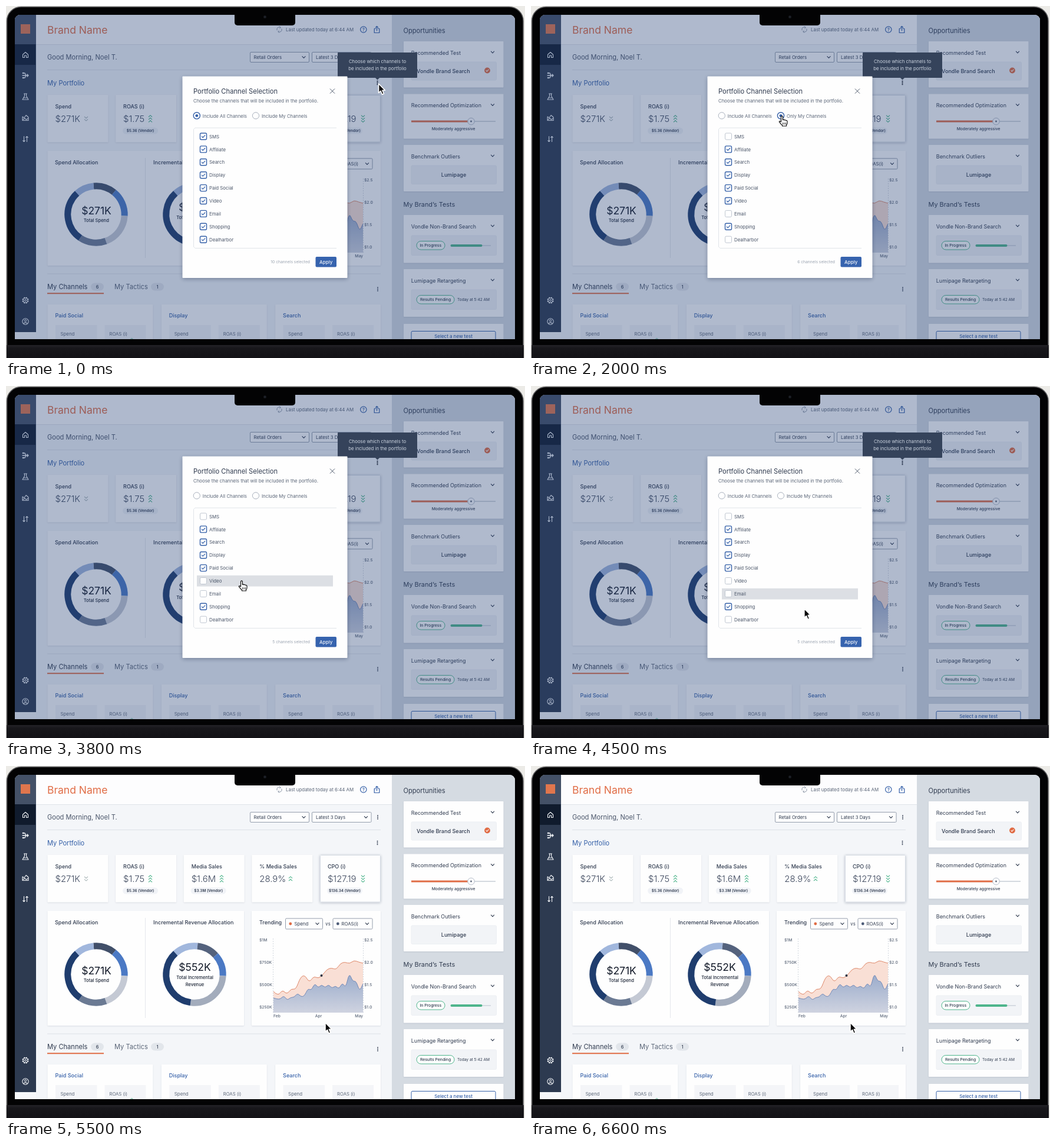
These frames come from a looping animation (881x598 px, 6700 ms). An HTML page with a canvas:

```html
<!DOCTYPE html>
<html lang="en">
<head>
<meta charset="utf-8">
<title>Portfolio channel selection</title>
<style>
html, body { margin: 0; width: 100%; height: 100%; overflow: hidden; background: #ecebe7; }
canvas { display: block; width: 881px; height: 598px; }
</style>
</head>
<body>
<canvas id="stage"></canvas>
<script>
const W = 881, H = 598, LOOP = 6700;
const canvas = document.getElementById('stage');
const c = canvas.getContext('2d');
const dpr = window.devicePixelRatio || 1;
canvas.width = W * dpr;
canvas.height = H * dpr;

const INK = '#303b4f', GREY = '#5b6678', BLUE = '#3560a8', ORANGE = '#e06c45',
      GREEN = '#4fb58c', NAVY = '#1f3d6e', SLATE = '#2d3a50', PALE = '#f2f4f7';

// Drawing helpers. Text y is the middle of the capitals.
function text(s, x, y, size, color = INK, weight = 400, align = 'left') {
  c.font = `${weight} ${size}px Inter, sans-serif`;
  c.textAlign = align;
  c.fillStyle = color;
  c.fillText(s, x, y + size * 0.364);
}
const mid = (s, x, y, size, color, weight) => text(s, x, y, size, color, weight, 'center');

function box(x, y, x2, y2, fill, stroke, r = 0, lw = 1) {
  c.beginPath();
  c.roundRect(x, y, x2 - x, y2 - y, r);
  if (fill) { c.fillStyle = fill; c.fill(); }
  if (stroke) { c.strokeStyle = stroke; c.lineWidth = lw; c.stroke(); }
}

function dot(x, y, r, fill, stroke, lw = 1) {
  c.beginPath();
  c.arc(x, y, r, 0, 7);
  if (fill) { c.fillStyle = fill; c.fill(); }
  if (stroke) { c.strokeStyle = stroke; c.lineWidth = lw; c.stroke(); }
}

function line(color, lw, ...p) {
  c.beginPath();
  c.moveTo(p[0], p[1]);
  for (let i = 2; i < p.length; i += 2) c.lineTo(p[i], p[i + 1]);
  c.strokeStyle = color;
  c.lineWidth = lw;
  c.stroke();
}

function icon(x, y, d, color, lw = 1.1, fill) {
  c.save();
  c.translate(x, y);
  const p = new Path2D(d);
  if (fill) { c.fillStyle = fill; c.fill(p); }
  c.strokeStyle = color;
  c.lineWidth = lw;
  c.lineJoin = c.lineCap = 'round';
  c.stroke(p);
  c.restore();
}

function chevron(x, y, color = INK) { icon(x, y, 'M-2.6-1.4L0 1.4L2.6-1.4', color, 1.1); }

function arrows(x, y, n, dir, color) {
  for (let i = 0; i < n; i++) {
    const v = y + (i - (n - 1) / 2) * 4.4;
    line(color, 1.1, x - 3, v + dir * -1.4, x, v + dir * 1.4, x + 3, v + dir * -1.4);
  }
}

function kebab(x, y) {
  for (const d of [-2.8, 0, 2.8]) dot(x, y + d, 0.95, INK);
}

function card(x, y, x2, y2, strong) {
  c.save();
  c.shadowColor = strong ? 'rgba(40,55,85,.32)' : 'rgba(40,55,85,.13)';
  c.shadowBlur = (strong ? 4 : 2.5) * dpr;
  c.shadowOffsetY = dpr;
  box(x, y, x2, y2, '#fefefe', null, 1);
  c.restore();
}

function pick(x, y, x2, y2, label, lx) {
  box(x + .5, y + .5, x2 - .5, y2 - .5, '#fefefe', '#949dac', 1.5);
  text(label, lx, (y + y2) / 2, 7.8);
  chevron(x2 - 9.5, (y + y2) / 2);
}

function donut(x, y, parts) {
  for (let i = 0; i < parts.length; i++) {
    const a = parts[i][0], b = i + 1 < parts.length ? parts[i + 1][0] : parts[0][0] + 360;
    c.beginPath();
    c.arc(x, y, 48.2, (a - 90) * Math.PI / 180, (b - 90) * Math.PI / 180);
    c.strokeStyle = parts[i][1];
    c.lineWidth = 11;
    c.stroke();
  }
}

function area(ys, fill, stroke) {
  const x0 = 454, w = 152, n = ys.length - 1, px = i => x0 + w * i / n;
  const trace = () => {
    c.moveTo(x0, ys[0]);
    for (let i = 1; i < n; i++)
      c.quadraticCurveTo(px(i), ys[i], (px(i) + px(i + 1)) / 2, (ys[i] + ys[i + 1]) / 2);
    c.lineTo(x0 + w, ys[n]);
  };
  c.beginPath(); trace();
  c.lineTo(x0 + w, 419); c.lineTo(x0, 419);
  c.fillStyle = fill; c.fill();
  c.beginPath(); trace();
  c.strokeStyle = stroke; c.lineWidth = 1; c.stroke();
}

// Dashboard
function sidebar() {
  box(15, 15, 51, 566, '#f7f8fa');
  box(15, 15, 51, 554, SLATE);
  box(15, 15, 51, 65, '#445167');
  box(15, 65, 50, 100, '#101b2d');
  box(25, 31, 41, 47, '#e0764d');
  const w = '#f4f6f9';
  icon(33, 83, 'M-4.5-.5L0-4.5L4.5-.5V4.5H1.5V1H-1.5V4.5H-4.5Z', w);
  icon(33, 118, 'M-4-4H-1L1 0H5M-4 4H-1L1 0H-5M3-2L5 0L3 2', w, 1.3);
  dot(-4 + 33, 114, 1.3, w); dot(29, 122, 1.3, w);
  icon(33, 154, 'M-2.5-5H2.5M-1.5-5V-1L-5 5H5L1.5-1V-5M-3 2H3', w);
  icon(33, 190, 'M-5 4.5V-2L-2 0L1-4.5L5-1V4.5ZM-4.5 3L-1 1L1.5 3L4.5 1', w);
  icon(33, 226, 'M-2.5-4.5V4.5M-4.3 2.7L-2.5 4.5L-.7 2.7M2.5 4.5V-4.5M.7-2.7L2.5-4.5L4.3-2.7', w);
  for (let i = 0; i < 8; i++) {
    const a = i * Math.PI / 4 + .39;
    line(w, 2, 33 + 3.6 * Math.cos(a), 500 + 3.6 * Math.sin(a), 33 + 5.6 * Math.cos(a), 500 + 5.6 * Math.sin(a));
  }
  dot(33, 500, 4, null, w, 1.1);
  dot(33, 500, 1.6, null, w, 1);
  dot(33, 536, 5.2, null, w, 1.1);
  dot(33, 534.5, 1.7, null, w, 1);
  icon(33, 536, 'M-3 3.5C-2 1.3 2 1.3 3 3.5', w);
}

function header() {
  box(51, 15, 655, 65, '#fdfdfe');
  line('#dfe3e9', 1, 51, 65.5, 655, 65.5);
  text('Brand Name', 70, 40.3, 17.5, ORANGE);
  icon(464, 40, 'M-4 1A4 4 0 0 1 2-3.6M4-1A4 4 0 0 1-2 3.6M.5-5L2.2-3.5L.6-2M-.5 5L-2.2 3.5L-.6 2', '#8b95a5', 1);
  text('Last updated today at 6:44 AM', 475, 40, 7.9, GREY);
  dot(606.8, 40, 5.2, null, BLUE, 1.2);
  mid('?', 606.8, 40, 7.8, BLUE, 600);
  icon(629.5, 40, 'M-2-1.5H-4.3V5.5H4.3V-1.5H2M0 2V-5.5M-2.3-3.3L0-5.6L2.3-3.3', BLUE, 1.2);
  text('Good Morning, Noel T.', 70, 86.7, 11.1, '#4b566a');
  pick(414, 78, 515, 96, 'Retail Orders', 420.5);
  pick(519, 78, 620.5, 96, 'Latest 3 Days', 526);
  kebab(631, 87);
  line('#dde1e7', 1, 70, 108.5, 636, 108.5);
}

function metrics() {
  text('My Portfolio', 70, 130.7, 11.1, BLUE);
  kebab(630.5, 130.5);
  const list = [
    ['Spend', '$271K', '', 2, 1, '#a9b6b8', 136],
    ['ROAS (i)', '$1.75', '$5.36 (Vendor)', 3, -1, GREEN, 245],
    ['Media Sales', '$1.6M', '$3.3M (Vendor)', 3, -1, GREEN, 366],
    ['% Media Sales', '28.9%', '', 2, -1, GREEN, 483],
    ['CPO (i)', '$127.19', '$136.34 (Vendor)', 3, 1, GREEN, 606]
  ];
  list.forEach(([name, value, note, n, dir, color, ax], i) => {
    const x = 70.5 + i * 115.6;
    card(x, 151, x + 103, 231.5, i === 4);
    if (i === 4) box(x + .5, 151.5, x + 102.5, 231, null, '#d3d9e2', 1);
    text(name, x + 13, 171, 9, INK, 500);
    text(value, x + 13, 192, 14.9, '#39445a', 300);
    arrows(ax, 191.5, n, dir, color);
    if (note) {
      box(x + 12, 206.5, x + 72, 217.5, '#f1f3f7', null, 5.5);
      mid(note, x + 42, 212, 6.4, INK, 600);
    }
  });
}

function charts() {
  card(70.5, 246, 404, 441);
  card(417, 246, 636, 441);
  line('#e4e7ec', 1, 236.5, 258, 236.5, 428);
  text('Spend Allocation', 83, 265.7, 9.05, INK, 500);
  text('Incremental Revenue Allocation', 250, 265.7, 9.05, INK, 500);
  donut(153, 354, [[-5, '#414f69'], [39, '#4b79c4'], [93, '#c4c9d4'], [160, '#6b7a93'], [214, NAVY], [318, '#a1b7dd']]);
  mid('$271K', 153.5, 347.7, 17.5, '#111827');
  mid('Total Spend', 153.3, 364.7, 7.6, '#1b2435', 500);
  donut(320, 354, [[-42, '#a1b7dd'], [6, '#54627d'], [48, '#4b79c4'], [93, '#a3acbc'], [188, NAVY]]);
  mid('$552K', 320.5, 341.5, 17.5, '#111827');
  mid('Total Incremental', 320.5, 359, 7.6, '#1b2435', 500);
  mid('Revenue', 320.5, 371, 7.6, '#1b2435', 500);

  text('Trending', 430, 265.7, 9, INK, 500);
  pick(474, 258.5, 538, 277.5, 'Spend', 489.5);
  dot(482.8, 268, 2.4, ORANGE);
  mid('vs', 546.5, 268, 7.6);
  pick(554.5, 258.5, 622.5, 277.5, 'ROAS(i)', 569.5);
  dot(563.3, 268, 2.4, '#4d5c78');
  c.setLineDash([2, 2]);
  line('#d2d7df', 1, 453.5, 293, 453.5, 419);
  line('#d2d7df', 1, 606.5, 293, 606.5, 419);
  c.setLineDash([]);
  area([383, 391, 380, 388, 378, 380, 359, 355, 368, 357, 361, 355, 345, 343, 346, 335, 333, 336, 330, 333, 335],
    '#f9dfd5', '#de8768');
  const g = c.createLinearGradient(0, 360, 0, 419);
  g.addColorStop(0, '#9fafcd');
  g.addColorStop(1, '#cfd3e0');
  area([394, 396, 396, 390, 398, 393, 393, 386, 392, 391, 378, 381, 369, 377, 371, 377, 371, 378, 373, 379, 368, 377, 351, 366, 365, 383, 370],
    g, '#7189b8');
  dot(535.5, 356, 2, '#24303f');
  ['$1M', '$750K', '$500K', '$250K'].forEach((s, i) => text(s, 430, 295.6 + i * 38.1, 6.75, GREY, 500));
  ['$2.5', '$2.0', '$1.5', '$1.0'].forEach((s, i) => text(s, 608, 295.6 + i * 38.1, 6.75, GREY, 500));
  text('Feb', 454, 425, 6.75, GREY, 500);
  mid('Apr', 530.5, 425, 6.75, GREY, 500);
  text('May', 606, 425, 6.75, GREY, 500, 'right');
}

function channels() {
  line('#dde1e7', 1, 70, 455, 636, 455);
  text('My Channels', 70, 477, 11.1, INK);
  text('My Tactics', 184, 477, 11.1, GREY);
  [['6', 155], ['1', 257]].forEach(([s, x]) => {
    box(x - 11, 470.5, x + 11, 483.5, '#e2e6eb', null, 6.5);
    mid(s, x, 477, 7.4, INK, 500);
  });
  box(70, 487.2, 166, 489.2, ORANGE);
  kebab(631, 481);
  ['Paid Social', 'Display', 'Search'].forEach((s, i) => {
    const x = 70.5 + i * 193.3;
    card(x, 507, x + 179, 580);
    text(s, x + 13, 526, 9.05, BLUE, 500);
    box(x + 13.5, 542, x + 84, 570, '#f4f5f8');
    box(x + 97, 542, x + 167, 570, '#f4f5f8');
    text('Spend', x + 22, 557, 7.85, GREY);
    text('ROAS (i)', x + 105, 557, 7.7, GREY);
  });
  line(GREEN, 1, 211.5, 566, 213.5, 564.5, 215.5, 566);
}

function panel() {
  box(655, 15, 864, 566, '#d5dbe2');
  text('Opportunities', 674.5, 41.7, 11.1, INK);
  text('My Brand’s Tests', 674.5, 337.5, 10.9, INK);
  const cards = [[60, 138.5, 'Recommended Test'], [149.5, 225.5, 'Recommended Optimization'],
    [236, 315, 'Benchmark Outliers'], [355, 436.5, 'Vondle Non-Brand Search'], [447, 528, 'Lumipage Retargeting']];
  for (const [y, y2, s] of cards) {
    card(675, y, 844.5, y2);
    text(s, 687.8, y + 19.3, 8.95, INK);
    chevron(826, y + 18.5);
  }
  for (const [y, y2] of [[95, 126], [271, 302.5], [390, 423.5], [482, 515.5]])
    box(688, y, 832.5, y2, PALE, '#eceff3', 2);
  text('Vondle Brand Search', 697, 110.5, 9.05, INK, 500);
  dot(817, 109.5, 4.9, ORANGE);
  icon(817, 109.5, 'M-2 .1L-.6 1.6L2.1-1.5', '#fff', 1.1);
  line('#c6ccd5', 1.5, 789, 196, 831, 196);
  line(ORANGE, 3.2, 688, 196, 786, 196);
  dot(789.5, 196, 5.8, '#fdfdfe', '#b4bcc8');
  dot(789.5, 196, 1.4, GREY);
  mid('Moderately aggressive', 759.5, 209, 6.75, INK, 500);
  mid('Lumipage', 760, 286.7, 9, INK, 500);
  box(697, 399.5, 745, 414, '#fbfdfc', GREEN, 7.2);
  mid('In Progress', 720.8, 406.8, 6.8, INK, 500);
  line('#cdd3db', 1.5, 808, 407, 823, 407);
  box(754.5, 405, 808.5, 409, GREEN, null, 2);
  box(697, 491.5, 761, 506, '#fbfdfc', GREEN, 7.2);
  mid('Results Pending', 729, 498.8, 6.8, INK, 500);
  text('Today at 5:42 AM', 766, 498.8, 6.6, INK);
  card(675, 540, 844.5, 580);
  box(688, 552.5, 831, 572, '#fefefe', BLUE, 2);
  mid('Select a new test', 759.5, 560.8, 7.95, BLUE, 500);
}

// Overlay parts
function tooltip() {
  box(563, 79, 698, 122, '#35435b', null, 1);
  c.beginPath();
  c.moveTo(627, 122); c.lineTo(634, 122); c.lineTo(630.5, 125.5);
  c.fill();
  mid('Choose which channels to', 630.5, 94.3, 7.8, '#cbd3df');
  mid('be included in the portfolio', 630.5, 106.3, 7.8, '#cbd3df');
}

function radio(x, on, label) {
  dot(x, 186.3, 5.6, '#fff', on ? BLUE : '#a9b1bd', on ? 1.4 : 1);
  if (on) dot(x, 186.3, 2.4, BLUE);
  text(label, x + 10, 186.7, 7.82, GREY);
}

const ROWS = ['SMS', 'Affiliate', 'Search', 'Display', 'Paid Social', 'Video', 'Email', 'Shopping', 'Dealharbor'];
const ROW_Y = 221.5, ROW_H = 21.9;
const CLICK_MINE = 1900, CLICK_VIDEO = 3700, APPLY_OVER = 4850, CLOSE = 5500;

function modal(t) {
  const mine = t >= CLICK_MINE, cut = t >= CLICK_VIDEO;
  c.save();
  c.shadowColor = 'rgba(20,35,65,.35)';
  c.shadowBlur = 7 * dpr;
  c.shadowOffsetY = 2 * dpr;
  box(299.5, 119.5, 579.5, 462, '#fefefe', null, 1);
  c.restore();
  text('Portfolio Channel Selection', 318, 144.7, 11.2, INK);
  text('Choose the channels that will be included in the portfolio.', 318, 161, 7.83, GREY);
  icon(554, 144.6, 'M-3.8-3.8L3.8 3.8M3.8-3.8L-3.8 3.8', '#515c6e', 1);
  radio(323.8, !mine, 'Include All Channels');
  radio(424, mine && !cut, mine && !cut ? 'Only My Channels' : 'Include My Channels');
  line('#e0e4e9', 1, 561, 207, 321, 207, 318.5, 209.5, 318.5, 409, 321, 411.5, 561, 411.5);
  const hover = hoverRow(t);
  ROWS.forEach((s, i) => {
    const y = ROW_Y + i * ROW_H;
    if (i === hover) box(324, y - 9.2, 555, y + 9.6, '#dcdfe4');
    const on = !(mine && (i === 0 || i === 6 || i === 8)) && !(cut && i === 5);
    box(329.5, y - 5.5, 340.5, y + 5.5, '#fff', on ? BLUE : '#bfc6d0', 2, on ? 1.4 : 1);
    if (on) icon(335, y, 'M-2.6 .1L-.8 2L2.8-1.9', BLUE, 1.2);
    text(s, 345, y + .3, 7.85, '#4a5568');
  });
  text((cut ? 5 : mine ? 6 : 10) + ' channels selected', 516, 434.7, 6.75, '#9aa3b0', 400, 'right');
  box(525.5, 426, 561, 443.5, t >= APPLY_OVER ? '#294c89' : '#3663ae', null, 2);
  mid('Apply', 543.2, 434.8, 8, '#f4f7fb', 500);
}

// Pointer: eased moves along quadratic curves [start, end, from, bend, to]
const MOVES = [
  [400, 1458, [632.5, 132], [514, 193], [426, 187]],
  [2700, 3342, [426, 187], [344.7, 249.3], [400, 331]],
  [4100, 4960, [400, 331], [471, 383.5], [542, 436]]
];

function pointer(t) {
  let m = MOVES[0];
  for (const k of MOVES) if (t >= k[0]) m = k;
  const u = Math.min(1, Math.max(0, (t - m[0]) / (m[1] - m[0])));
  const s = u * u * (3 - 2 * u), q = 1 - s;
  return [0, 1].map(i => q * q * m[2][i] + 2 * q * s * m[3][i] + s * s * m[4][i]);
}

// Only Video and Email react, a moment after the pointer enters.
function hoverRow(t) {
  const i = Math.round((pointer(Math.max(0, t - 150))[1] - ROW_Y) / ROW_H);
  return t > 2700 && (i === 5 || i === 6) ? i : -1;
}

function cursor(t) {
  const [x, y] = pointer(t);
  const hand = t >= 1400 && t < 2750 || t < CLOSE && (t >= 4900 || t < 4250 && hoverRow(t) === 5);
  if (hand) {
    icon(x, y, 'M-1.5 1Q0-1.2 1.4 1V6.5Q2.8 5.2 4 6.8Q5.5 5.8 6.6 7.5Q8.6 6.8 9 9V12Q8.8 14 7.5 15V17H.5V15.5Q-2 13.5-4.6 9.8Q-4.8 7.6-1.5 9.8Z', '#111', 1.2, '#fff');
    icon(x, y, 'M1.6 11.5V14M4 11.5V14M6.4 11.5V14', '#111', .9);
  } else {
    icon(x, y, 'M0 0V15.5L3.5 12.3L6 18.2L8.9 17L6.4 11.2H11Z', '#fff', 1.6, '#0b0b0c');
  }
}

// Laptop shell
function shell() {
  box(0, 0, W, H, '#ecebe7');
  box(1.5, 1.5, 878, 620, '#030304', '#58585a', 24, 1.6);
}

function shellFront() {
  const g = c.createLinearGradient(0, 576, 0, H);
  g.addColorStop(0, '#232227');
  g.addColorStop(.25, '#18171b');
  g.addColorStop(1, '#131216');
  box(1, 576, 879, H, g);
  box(388, 10, 491, 33, '#030304', null, [0, 0, 5, 5]);
  dot(439.5, 18.5, 2.6, '#15171c');
  dot(439.5, 18.5, 1, '#2a2f3a');
}

function draw(t) {
  c.setTransform(dpr, 0, 0, dpr, 0, 0);
  shell();
  c.save();
  c.beginPath();
  c.roundRect(15, 15, 849, 551, [9, 9, 0, 0]);
  c.clip();
  box(15, 15, 864, 566, '#f4f6f9');
  header();
  metrics();
  charts();
  channels();
  panel();
  sidebar();
  if (t < CLOSE) {
    box(15, 15, 864, 566, 'rgba(36,66,116,.36)');
    tooltip();
    kebab(630.5, 130.5);
    modal(t);
  }
  c.restore();
  shellFront();
  cursor(t);
}

const start = performance.now();
function frame() {
  draw((performance.now() - start) % LOOP);
  requestAnimationFrame(frame);
}
frame();
</script>
</body>
</html>
```
